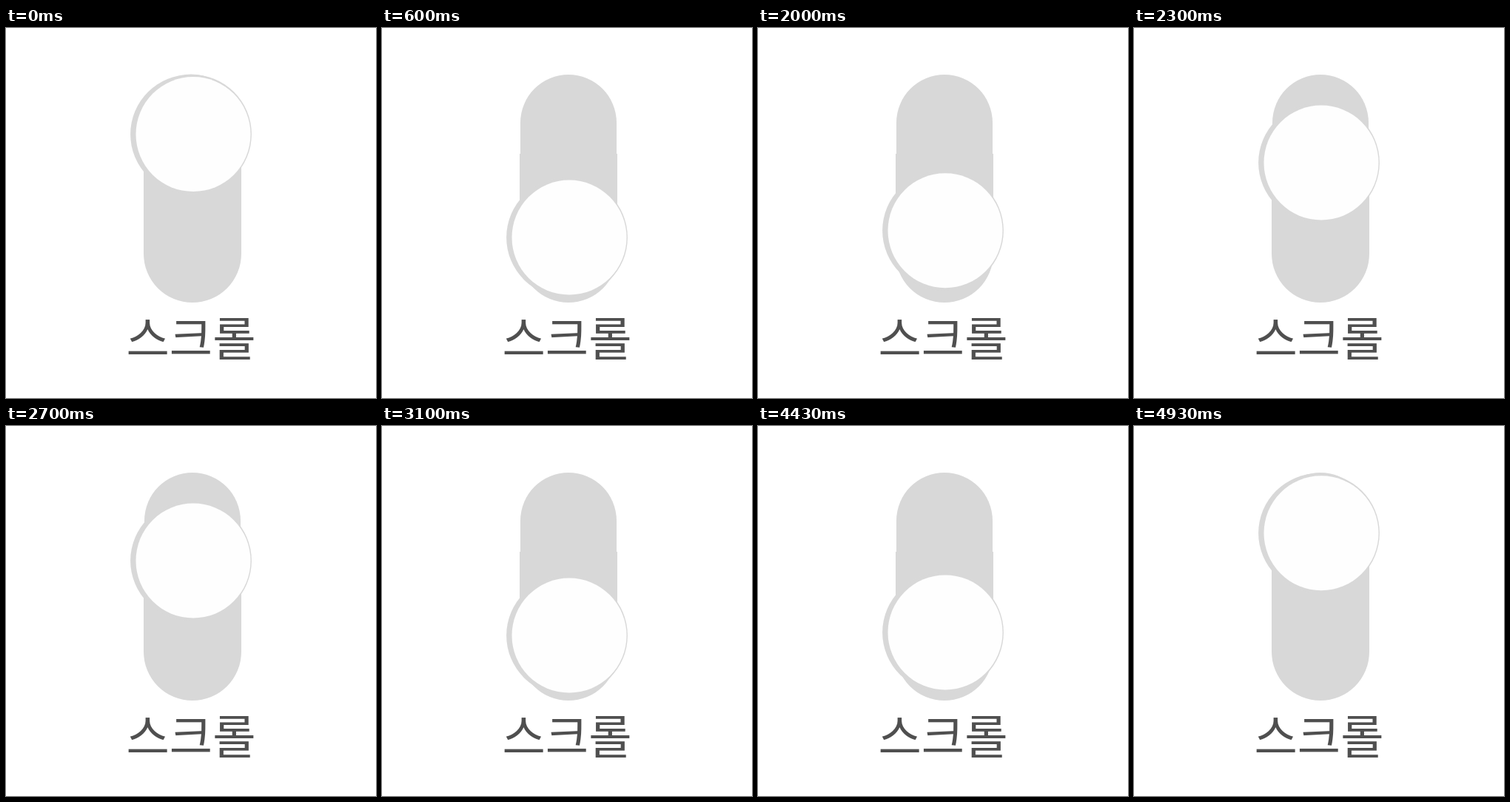
An HTML page for the animation above (5010 ms loop, 500 by 500 pixels).

```html
<!DOCTYPE html>
<html lang="ko">
<head>
<meta charset="utf-8">
<style>
  html, body { margin: 0; width: 100%; height: 100%; overflow: hidden; background: #fff; }
  svg { display: block; width: 100%; height: 100%; }
  text { font: 400 63.4px "Noto Sans CJK KR", "Noto Sans CJK", "Noto Sans CJK JP", sans-serif; }
</style>
</head>
<body>
<svg viewBox="0 0 500 500">
  <path fill="#d8d8d8" d="M187 128a65 65 0 0 1 130 0V170h1V305a66 66 0 0 1-132 0V170h1z"/>
  <g id="knob">
    <ellipse cx="250" rx="81.9" ry="81" fill="#d8d8d8"/>
    <circle cx="253" r="77.5" fill="#fefefe"/>
  </g>
  <text x="250" y="442.5" text-anchor="middle" fill="#4f4f4f">스크롤</text>
</svg>
<script>
const LOOP = 5010, TOP = 143.6, BOTTOM = 295.1;
const knob = document.getElementById('knob');

// Cubic Bézier easing (.36, 0, .02, 1)
function ease(x) {
  let lo = 0, hi = 1;
  for (let i = 0; i < 24; i++) {
    const s = (lo + hi) / 2, r = 1 - s;
    if (3 * .36 * s * r * r + 3 * .02 * s * s * r + s * s * s < x) lo = s;
    else hi = s;
  }
  return lo * lo * (3 - 2 * lo);
}

// Steps of 50 ms, shown alternately for 30 and 70 ms
function stepAt(ms) {
  return Math.min(99, 2 * Math.floor(ms / 100) + (ms % 100 >= 30 ? 1 : 0));
}

// Down for 20 steps, rest for 10, then the same path back up
function render(ms) {
  const step = stepAt(ms % LOOP) % 50;
  const phase = step < 30 ? Math.min(step, 20) : 50 - step;
  const y = TOP + (BOTTOM - TOP) * ease(phase / 20);
  knob.setAttribute('transform', `translate(0 ${y.toFixed(2)})`);
}

const start = performance.now();
function tick() {
  render(performance.now() - start);
  requestAnimationFrame(tick);
}
tick();
</script>
</body>
</html>
```
